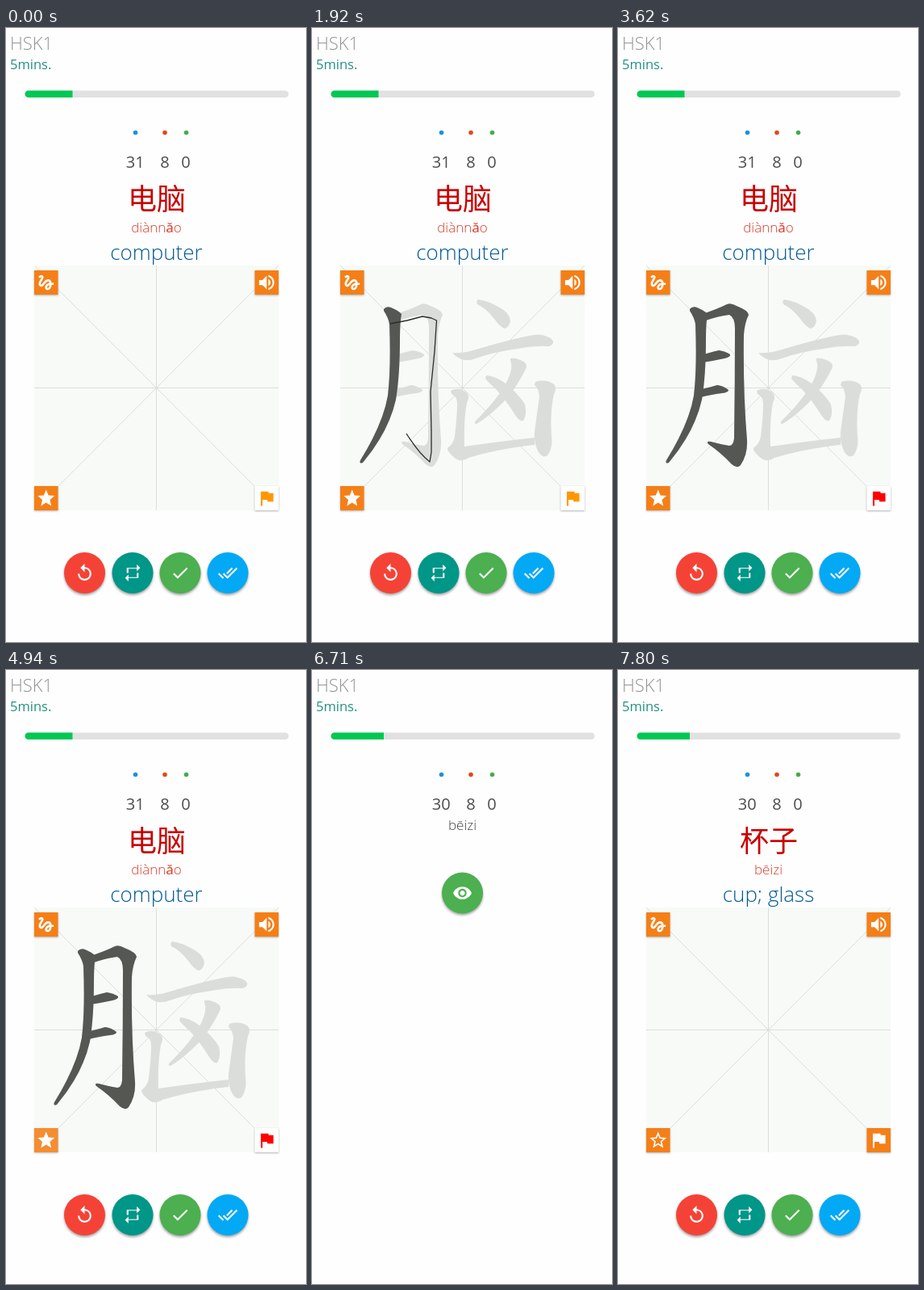
An HTML page for the animation above (8 s loop, 372 by 760 pixels).

```html
<!DOCTYPE html>
<html lang="en">
<head>
<meta charset="utf-8">
<title>Character practice</title>
<style>
  html, body { margin: 0; width: 100%; height: 100%; overflow: hidden; background: #fefefe; }
  svg { display: block; width: 372px; height: 760px; }
  text { font-family: "Open Sans", "Noto Sans", sans-serif; font-weight: 300; }
  .mid { text-anchor: middle; }
  .num { font-size: 20px; font-weight: 400; fill: #4a4f4a; }
  .han { font-family: "Noto Sans CJK SC", "Noto Sans CJK", sans-serif; font-size: 36px; font-weight: 400; fill: #c80000; }
  .pinyin { font-size: 17px; fill: #dc3c28; }
  .sense { font-size: 26px; fill: #005a96; }
  .tile { filter: drop-shadow(0 1px 1px rgba(0,0,0,.3)); }
  .fab { filter: drop-shadow(0 2.5px 1.5px rgba(0,0,0,.36)); }
  .line { fill: none; stroke: #2b2b2b; stroke-width: 1.3; stroke-linejoin: round; }
</style>
</head>
<body>
<svg viewBox="0 0 372 760">
  <text x="5" y="27" font-size="22" fill="#8f948f">HSK1</text>
  <text x="5" y="51" font-size="16.5" style="font-weight:400" fill="#1f9080">5mins.</text>

  <clipPath id="track"><rect x="23.5" y="77.5" width="327" height="8.5" rx="4.25"/></clipPath>
  <g clip-path="url(#track)">
    <rect x="23" y="77" width="328" height="10" fill="#e1e1e1"/>
    <rect id="bar" x="23" y="77" width="59.5" height="10" fill="#00c853"/>
  </g>

  <circle cx="160.5" cy="129.5" r="2.8" fill="#1e90e0"/>
  <circle cx="197" cy="129.5" r="2.8" fill="#e04a1c"/>
  <circle cx="223.5" cy="129.5" r="2.8" fill="#45ac4d"/>
  <text id="left" class="mid num" x="160.3" y="173">31</text>
  <text class="mid num" x="197" y="173">8</text>
  <text class="mid num" x="223" y="173">0</text>

  <g id="front">
    <text class="mid" x="186.5" y="198" font-size="17" fill="#444">bēizi</text>
  </g>

  <g id="back">
    <text id="han" class="mid han" x="187" y="224.5">电脑</text>
    <text id="pinyin" class="mid pinyin" x="186.5" y="253">diànnǎo</text>
    <text id="sense" class="mid sense" x="186.5" y="287">computer</text>
    <rect x="35" y="294" width="303" height="303" fill="#f7faf7"/>
    <path d="M35 294L338 597M338 294L35 597M186.5 294V597M35 445.5H338" fill="none" stroke="#dcdedc"/>
    <g id="ink"></g>
  </g>
</svg>
<script>
const LOOP = 8000, NEXT = 6630, REVEAL = 7410;
const ORANGE = '#f57f17';

const icons = {
  gesture: 'M4.59 6.89c.7-.71 1.4-1.35 1.71-1.22.5.2 0 1.03-.3 1.52-.25.42-2.86 3.89-2.86 6.31 0 1.28.48 2.34 1.34 2.98.75.56 1.74.73 2.64.46 1.07-.31 1.95-1.4 3.06-2.77 1.21-1.49 2.83-3.44 4.08-3.44 1.63 0 1.65 1.01 1.76 1.79-3.78.64-5.38 3.67-5.38 5.37 0 1.7 1.44 3.09 3.21 3.09 1.63 0 4.29-1.33 4.69-6.1H21v-2.5h-2.47c-.15-1.65-1.09-4.2-4.03-4.2-2.25 0-4.18 1.91-4.94 2.84-.58.73-2.06 2.48-2.29 2.72-.25.3-.68.84-1.11.84-.45 0-.72-.83-.36-1.92.35-1.09 1.4-2.86 1.85-3.52.78-1.14 1.3-1.92 1.3-3.28C8.95 3.69 7.31 3 6.44 3 5.12 3 3.97 4 3.72 4.25c-.36.36-.66.66-.88.93zm9.29 11.66c-.31 0-.74-.26-.74-.72 0-.6.73-2.2 2.87-2.76-.3 2.69-1.43 3.48-2.13 3.48z',
  sound: 'M3 9v6h4l5 5V4L7 9zm13.5 3c0-1.77-1.02-3.29-2.5-4.03v8.05c1.48-.73 2.5-2.25 2.5-4.02zM14 3.23v2.06c2.89.86 5 3.54 5 6.71s-2.11 5.85-5 6.71v2.06c4.01-.91 7-4.49 7-8.77s-2.99-7.86-7-8.77z',
  star: 'M12 17.27L18.18 21l-1.64-7.03L22 9.24l-7.19-.61L12 2 9.19 8.63 2 9.24l5.46 4.73L5.82 21z',
  starLine: 'M22 9.24l-7.19-.62L12 2 9.19 8.63 2 9.24l5.46 4.73L5.82 21 12 17.27 18.18 21l-1.63-7.03zM12 15.4l-3.76 2.27 1-4.28-3.32-2.88 4.38-.38L12 6.1l1.71 4.04 4.38.38-3.32 2.88 1 4.28z',
  flag: 'M14.4 6L14 4H5v17h2v-7h5.6l.4 2h7V6z',
  replay: 'M12 5V1L7 6l5 5V7c3.31 0 6 2.69 6 6s-2.69 6-6 6-6-2.69-6-6H4c0 4.42 3.58 8 8 8s8-3.58 8-8-3.58-8-8-8z',
  repeat: 'M7 7h10v3l4-4-4-4v4H5v6h2zm10 10H7v-3l-4 4 4 4v-4h12v-6h-2z',
  check: 'M9 16.17L4.83 12l-1.42 1.41L9 19 21 7l-1.41-1.41z',
  checkAll: 'M18 7l-1.41-1.41-6.34 6.34 1.41 1.41zm4.24-1.41L11.66 16.17 7.48 12l-1.41 1.41L11.66 19l12-12zM.41 13.41L6 19l1.41-1.41L1.83 12z',
  eye: 'M12 4.5C7 4.5 2.73 7.61 1 12c1.73 4.39 6 7.5 11 7.5s9.27-3.11 11-7.5c-1.73-4.39-6-7.5-11-7.5zM12 17c-2.76 0-5-2.24-5-5s2.24-5 5-5 5 2.24 5 5-2.24 5-5 5zm0-8c-1.66 0-3 1.34-3 3s1.34 3 3 3 3-1.34 3-3-1.34-3-3-3z'
};

const written = [
  { shape: 'M89 348Q92 344 98 346Q106 349 111 354Q109 365 109 385Q109 430 104 460Q95 500 63 538Q58 540 60 535Q88 490 94 455Q98 420 96 367Q95 359 89 350Z',
    line: 'M97 352L104 370L104 430L96 475L66 532', draw: [960, 1240], fade: [1350, 1600] },
  { shape: 'M105 354Q125 347 135 342Q140 340 147 344Q162 350 162 355Q157 365 156 380Q155 450 160 510Q161 528 152 541Q148 546 141 540Q128 526 112 515Q109 511 115 512Q130 516 138 517Q143 517 144 508Q145 440 145 372Q145 358 138 355Q126 356 106 363Z',
    line: 'M97 366L118 362L137 357L148 359L154.500 362L152 400L147 450L148 500L148 525L146 537Q133 527 117 502', draw: [1480, 1780], fade: [1930, 2180] },
  { shape: 'M106 404Q120 400 125 399Q133 400 139 404Q140 407 132 409Q118 412 105 414Z',
    line: 'M104 399L130 393L155 390', draw: [2230, 2370], fade: [2380, 2600] },
  { shape: 'M104 447Q117 444 123 442Q131 443 137 448Q137 451 129 452Q114 454 103 457Z',
    line: 'M101 447L120 443L137 442', draw: [2500, 2600], fade: [2610, 2850] }
];
const rest = [
  'M206 336Q218 337 236 348Q246 355 246 363Q244 371 239 372Q233 370 226 360Q216 347 205 342Q203 338 206 336Z',
  'M174 402Q185 403 200 399Q250 384 275 380Q285 378 296 384Q303 390 294 394Q275 393 255 397Q225 401 203 409Q193 413 185 410Q177 406 174 402Z',
  'M246 409Q256 408 264 414Q268 418 264 424Q250 452 230 470Q216 483 204 490Q200 490 203 486Q230 460 242 437Q250 420 246 412Z',
  'M216 430Q226 430 240 440Q258 455 264 466Q267 478 262 486Q258 488 252 479Q240 460 228 447Q218 438 215 434Z',
  'M172 449Q181 444 190 450Q197 455 192 464Q188 485 189 518Q230 512 276 507L276 516Q230 521 194 532Q186 538 178 533Q167 524 168 520Q176 514 177 505Q180 480 180 465Q180 456 173 453Z',
  'M277 438Q290 434 300 441Q304 446 300 453Q295 475 297 505Q299 520 292 529Q286 533 281 525Q275 515 276 500Q280 470 282 456Q281 446 276 442Z'
];

const $ = id => document.getElementById(id);
const front = $('front'), back = $('back'), ink = $('ink');

function add(parent, tag, attrs) {
  const el = document.createElementNS('http://www.w3.org/2000/svg', tag);
  for (const k in attrs) el.setAttribute(k, attrs[k]);
  return parent.appendChild(el);
}

function icon(parent, name, cx, cy) {
  const k = 25 / 24;
  return add(parent, 'path', { d: icons[name], fill: '#fff', transform: `translate(${cx - 12.5} ${cy - 12.5}) scale(${k})` });
}

function tile(name, x, y) {
  const g = add(back, 'g', { class: 'tile' });
  const box = add(g, 'rect', { x, y, width: 29.5, height: 30, fill: ORANGE });
  return { g, box, mark: icon(g, name, x + 14.75, y + 15) };
}

function fab(parent, name, cx, cy, fill) {
  const g = add(parent, 'g', { class: 'fab' });
  add(g, 'circle', { cx, cy, r: 25.5, fill });
  icon(g, name, cx, cy);
  return g;
}

const guide = add(ink, 'path', { d: [...written.map(s => s.shape), ...rest].join(''), fill: '#dbdddb' });
for (const s of written) {
  s.body = add(ink, 'path', { d: s.shape, fill: '#555753' });
}
for (const s of written) {
  s.trace = add(ink, 'path', { d: s.line, class: 'line', pathLength: 1, 'stroke-dasharray': '1 2' });
}

tile('gesture', 35, 300);
tile('sound', 308.5, 300);
const star = tile('star', 35, 567), flag = tile('flag', 308.5, 567);
fab(back, 'replay', 97.5, 674.5, '#f44336');
fab(back, 'repeat', 157, 674.5, '#009688');
fab(back, 'check', 216, 674.5, '#4caf50');
fab(back, 'checkAll', 275, 674.5, '#03a9f4');
const eye = fab(front, 'eye', 186.5, 276, '#4caf50');

const ramp = (t, a, b) => Math.min(1, Math.max(0, (t - a) / (b - a)));
const ease = p => p < .5 ? 2 * p * p : 1 - 2 * (1 - p) * (1 - p);

// Touch feedback: 150 ms down to 20 %, 250 ms back after release.
function press(t, down, up) {
  const dimAt = x => 1 - .8 * ease(ramp(x, down, down + 150));
  if (t < up) return dimAt(t);
  const low = dimAt(up);
  return low + (1 - low) * ease(ramp(t, up, up + 250));
}

function render(t) {
  const next = t >= NEXT, hidden = next && t < REVEAL;
  front.style.display = hidden ? '' : 'none';
  back.style.display = hidden ? 'none' : '';
  ink.style.display = next ? 'none' : '';

  $('bar').setAttribute('width', next ? 66 : 59.5);
  $('left').textContent = next ? '30' : '31';
  $('han').textContent = next ? '杯子' : '电脑';
  $('pinyin').textContent = next ? 'bēizi' : 'diànnǎo';
  $('sense').textContent = next ? 'cup; glass' : 'computer';

  guide.style.opacity = ramp(t, 760, 930);
  for (const s of written) {
    const drawn = ramp(t, ...s.draw), shown = ramp(t, ...s.fade);
    s.body.style.opacity = shown;
    s.trace.style.opacity = drawn > 0 ? 1 - shown : 0;
    s.trace.setAttribute('stroke-dashoffset', 1 - drawn);
  }

  flag.box.setAttribute('fill', next ? ORANGE : '#fff');
  flag.mark.setAttribute('fill', next ? '#fff' : t < 3620 ? '#ff9800' : '#ff0000');
  flag.g.style.opacity = press(t, 3110, 3210);
  star.mark.setAttribute('d', next ? icons.starLine : icons.star);
  star.g.style.opacity = t < 5800 ? press(t, 4900, 5000) : press(t, 5890, 6130);
  eye.style.opacity = press(t, 7070, REVEAL);
}

const start = performance.now();
function tick() {
  render((performance.now() - start) % LOOP);
  requestAnimationFrame(tick);
}
tick();
</script>
</body>
</html>
```
